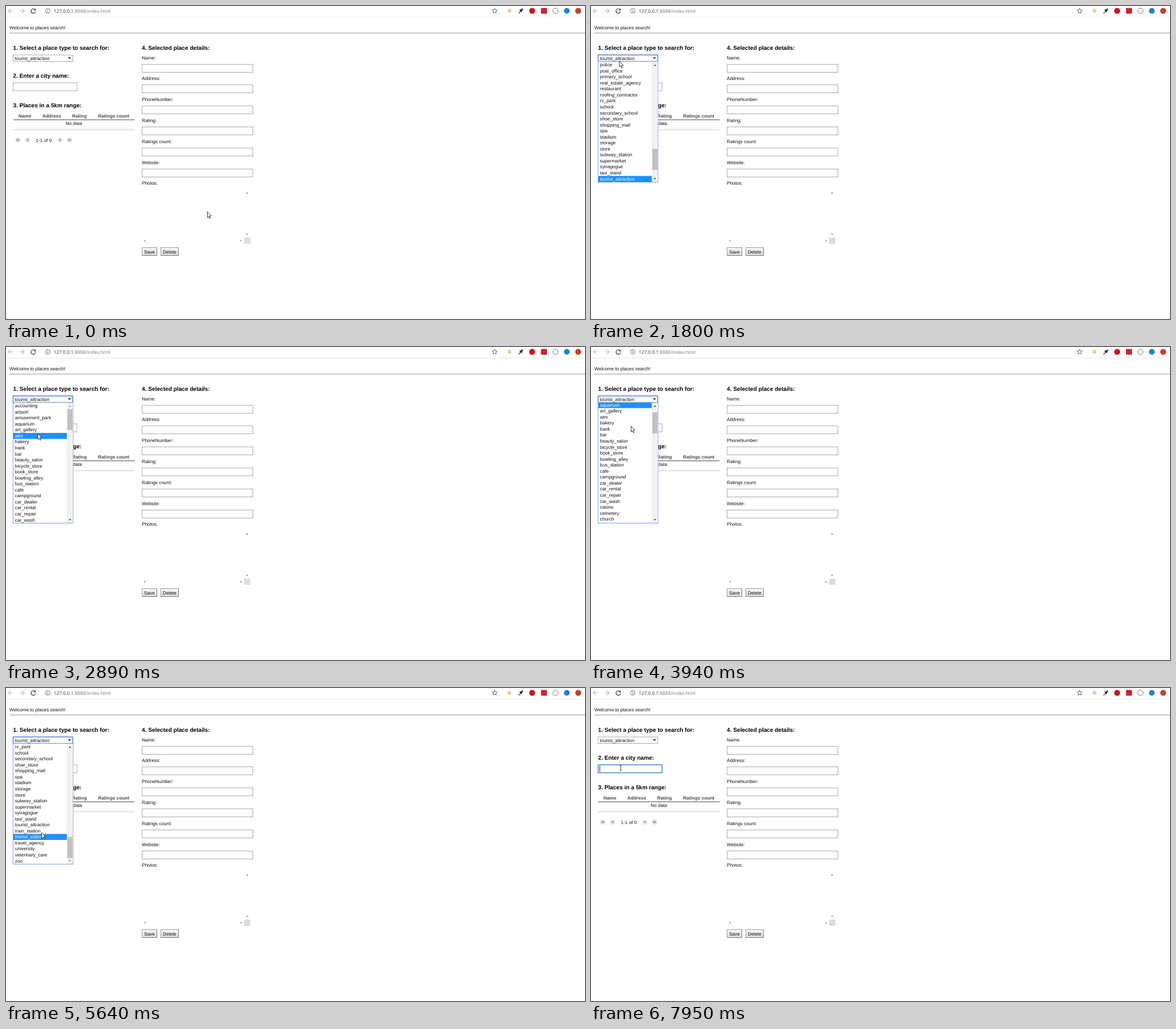
Recreate the animation shown at these times as an HTML page with a canvas. Size 1019 px wide and 550 px high, loop 8 s.

```html
<!DOCTYPE html>
<html lang="en">
<head>
<meta charset="utf-8">
<title>Places search</title>
<style>
html, body { margin: 0; width: 100%; height: 100%; overflow: hidden; background: #fff; }
canvas { display: block; }
</style>
</head>
<body>
<canvas id="stage" width="1019" height="550"></canvas>
<script>
const ctx = document.getElementById('stage').getContext('2d');
const LOOP = 8000, ROW = 10.55, LIST_TOP = 98.2, MAX_SCROLL = 83;
const OPEN = 1390, CLOSE = 6280, FOCUS_INPUT = 6930;
const SANS = '"Liberation Sans", Arial, sans-serif';
const BODY = '8.25px ' + SANS, BOLD = 'bold 8.25px ' + SANS, HEAD = 'bold 10.15px ' + SANS;
const URL_FONT = '8.25px "Open Sans", sans-serif';

const types = `accounting airport amusement_park aquarium art_gallery atm bakery bank bar
beauty_salon bicycle_store book_store bowling_alley bus_station cafe campground car_dealer
car_rental car_repair car_wash casino cemetery church city_hall clothing_store
convenience_store courthouse dentist department_store doctor drugstore electrician
electronics_store embassy establishment finance fire_station florist food funeral_home
furniture_store gas_station general_contractor grocery_or_supermarket gym hair_care
hardware_store health hindu_temple home_goods_store hospital insurance_agency jewelry_store
laundry lawyer library light_rail_station liquor_store local_government_office locksmith
lodging meal_delivery meal_takeaway mosque movie_rental movie_theater moving_company museum
night_club painter park parking pet_store pharmacy physiotherapist place_of_worship plumber
police post_office primary_school real_estate_agency restaurant roofing_contractor rv_park
school secondary_school shoe_store shopping_mall spa stadium storage store subway_station
supermarket synagogue taxi_stand tourist_attraction train_station transit_station
travel_agency university veterinary_care zoo`.split(/\s+/);

// Stepped tracks: [time, ...values], held until the next entry.
const pointer = [
  [0, 354.5, 361.5], [120, 348, 350], [260, 309, 297], [400, 243, 217], [530, 172, 138],
  [670, 115, 84], [810, 78, 62], [940, 58, 76], [1080, 50, 90], [1800, 50, 97],
  [1960, 53.5, 145], [2100, 53.5, 152.5], [2890, 56, 152], [3010, 63, 147], [3300, 67, 143],
  [3440, 70.5, 139], [4230, 68, 150], [4370, 64, 168], [4510, 62, 180.5], [4670, 62, 218],
  [4810, 62, 251], [5240, 62.5, 268], [5380, 62.5, 281], [5640, 62.5, 254],
  [5790, 62.5, 245], [5910, 62.5, 241], [6400, 58, 192], [6660, 52, 140.5]
];
const scrolling = [
  [0, 77], [2100, 66], [2220, 48], [2360, 28.85], [2500, 13], [2640, 3.1], [2770, 0],
  [3940, 3.13], [4090, 25], [4230, 56], [4370, MAX_SCROLL]
];
const hovering = [
  [0, 96], [1960, 81], [2890, 5], [3010, 4], [3440, 3], [4370, 89], [4670, 94],
  [4810, 97], [5240, 99], [5380, 100], [5640, 98], [5790, 97], [5910, 96]
];
const at = (track, t) => track.findLast(key => key[0] <= t).slice(1);

function text(str, x, y, font = BODY, color = '#111') {
  ctx.font = font;
  ctx.fillStyle = color;
  ctx.fillText(str, x, y);
}
function rect(x, y, w, h, color) {
  ctx.fillStyle = color;
  ctx.fillRect(x, y, w, h);
}
function box(x, y, w, h, stroke, fill = '#fff', width = 1) {
  rect(x, y, w, h, fill);
  ctx.strokeStyle = stroke;
  ctx.lineWidth = width;
  ctx.strokeRect(x, y, w, h);
}
function disc(x, y, r, color) {
  ctx.fillStyle = color;
  ctx.beginPath();
  ctx.arc(x, y, r, 0, 7);
  ctx.fill();
}
function path(d, x, y, stroke, width = 1, fill) {
  const shape = new Path2D(d);
  ctx.save();
  ctx.translate(x, y);
  if (fill) { ctx.fillStyle = fill; ctx.fill(shape); }
  if (stroke) { ctx.strokeStyle = stroke; ctx.lineWidth = width; ctx.stroke(shape); }
  ctx.restore();
}
// Triangle pointing right, turned by quarter turns.
function triangle(x, y, turns, color, size = 2.3) {
  ctx.save();
  ctx.translate(x, y);
  ctx.rotate(turns * Math.PI / 2);
  ctx.scale(size, size);
  path('M-.5 -1L.6 0L-.5 1Z', 0, 0, null, 0, color);
  ctx.restore();
}

function drawBrowserBar() {
  path('M4 0H-4M0 -4L-4 0L0 4', 8, 8.5, '#bbb', 1.1);
  path('M-4 0H4M0 -4L4 0L0 4', 28, 8.5, '#bbb', 1.1);
  path('M3.2 -2.2A4 4 0 1 0 4 1', 48, 8.5, '#444', 1.3);
  path('M4.4 -4.4V-.7H.7Z', 48, 8.5, null, 0, '#444');
  path('M4 0A4 4 0 1 1 -4 0A4 4 0 1 1 4 0M0 -.7V2.4M0 -2.4V-1.4', 73.5, 8.5, '#555', .9);
  text('127.0.0.1', 84, 11.5, URL_FONT, '#333');
  const hostWidth = ctx.measureText('127.0.0.1').width;
  text(':8888/index.html', 84 + hostWidth, 11.5, URL_FONT, '#777');
  path('M0 -4.5L1.3 -1.5L4.5 -1.2L2.1 .9L2.8 4L0 2.4L-2.8 4L-2.1 .9L-4.5 -1.2L-1.3 -1.5Z', 860, 8.5, '#555', .9);
  disc(886, 8.5, 3.4, '#e6cfa8');
  path('M-4 4.5L1.5 -1', 906, 8.5, '#777', 1.8);
  path('M-1.5 -2L2 1.5M.5 -.5L3.5 -3.5', 906, 8.5, '#2b3040', 2.6);
  disc(926, 8.5, 5.2, '#c8171d');
  rect(941.5, 3.5, 10.5, 10, '#d0202b');
  path('M4.7 0A4.7 4.7 0 1 1 -4.7 0A4.7 4.7 0 1 1 4.7 0', 967, 8.5, '#777', 1);
  disc(987, 8.5, 5, '#1c7fe0');
  disc(1007, 8.5, 5.2, '#c9402a');
  rect(0, 19, 1019, 1, '#e6e6e6');
}

function drawButton(label, x, w) {
  const shade = ctx.createLinearGradient(0, 425, 0, 439);
  shade.addColorStop(0, '#f8f8f8');
  shade.addColorStop(1, '#d8d8d8');
  box(x + .5, 424.5, w, 14, '#a0a0a0', shade);
  path(`M0 14H${w}V0`, x + .5, 424.5, '#777');
  text(label, x + 4, 435);
}

function drawPage(t) {
  text('Welcome to places search!', 6, 41);
  rect(6, 47, 1013, 1, '#8f9a92');

  text('1. Select a place type to search for:', 12.5, 77, HEAD, '#000');
  const selectFocused = t >= OPEN && t < FOCUS_INPUT;
  const idle = t >= 940 && t < OPEN ? '#777' : '#a9a9a9';
  box(12.5, 86, 105, 11.5, selectFocused ? '#4a78cf' : idle, '#fff', selectFocused ? 1.4 : 1);
  text('tourist_attraction', 15.5, 94.7);
  triangle(111.7, 91.5, 1, '#111', 2.7);

  text('2. Enter a city name:', 12.5, 126, HEAD, '#000');
  const inputFocused = t >= FOCUS_INPUT;
  box(12.5, 135, 112.5, 14, inputFocused ? '#4a84de' : '#a9a9a9', '#fff', inputFocused ? 1.5 : 1);
  if (inputFocused && (t < 7440 || t >= 7950)) rect(15, 137, 1, 10, '#111');

  text('3. Places in a 5km range:', 12.5, 177.5, HEAD, '#000');
  [['Name', 22], ['Address', 64], ['Rating', 116.5], ['Ratings count', 162]]
    .forEach(([label, x]) => text(label, x, 196, BOLD, '#4b4a4a'));
  rect(12.5, 199.3, 214, 1.3, '#6a6c70');
  text('No data', 105, 209);
  rect(12.5, 217, 214, 1, '#ccc');
  [21, 38, 95, 112].forEach(x => disc(x, 235.5, 4.8, '#e6e6e6'));
  rect(18.6, 233.3, 1, 4.4, '#777');
  triangle(21.8, 235.5, 2, '#777');
  triangle(38, 235.5, 2, '#777');
  triangle(95, 235.5, 0, '#777');
  triangle(110.5, 235.5, 0, '#888');
  triangle(113.2, 235.5, 0, '#888');
  text('1-1 of 0', 52.5, 239);

  text('4. Selected place details:', 239, 77, HEAD, '#000');
  ['Name', 'Address', 'PhoneNumber', 'Rating', 'Ratings count', 'Website', 'Photos']
    .forEach((label, i) => {
      const y = 93.5 + i * 36.83;
      text(label + ':', 239, y);
      if (i < 6) box(239.5, Math.round(y + 8) + .5, 195, 14, '#a9a9a9');
    });
  triangle(424.3, 328.5, 3, '#999');
  triangle(424.3, 401.3, 1, '#999');
  triangle(244.3, 412.5, 2, '#999');
  triangle(413.7, 412.5, 0, '#999');
  rect(419, 407, 11, 11, '#dcdcdc');
  drawButton('Save', 239, 26);
  drawButton('Delete', 272, 31);
}

function drawList(t) {
  const [scroll] = at(scrolling, t), [hover] = at(hovering, t);
  box(12.5, 97.5, 105.5, 212, '#7d9fdc');
  ctx.save();
  ctx.beginPath();
  ctx.rect(13, 98, 94, 211);
  ctx.clip();
  for (let i = Math.floor(scroll); i < Math.min(scroll + 20, types.length); i++) {
    const y = LIST_TOP + (i - scroll) * ROW;
    if (i === hover) rect(13, y, 94, ROW, '#1e90ff');
    text(types[i], 15.8, y + 7.9, BODY, i === hover ? '#fff' : '#111');
  }
  ctx.restore();
  rect(107, 98, 10.5, 211, '#f1f1f1');
  rect(108, 109 + scroll / MAX_SCROLL * 153, 9, 37, '#c1c1c1');
  triangle(112.5, 104, 3, scroll > 0 ? '#505050' : '#b0b0b0');
  triangle(112.5, 303.5, 1, scroll < MAX_SCROLL ? '#505050' : '#a3a3a3');
}

function drawPointer(t) {
  const [x, y] = at(pointer, t);
  if (t >= 6660) path('M-1.8 -4.5H-.4L0 -4L.4 -4.5H1.8M0 -4V4M-1.8 4.5H-.4L0 4L.4 4.5H1.8', x + .3, y, '#222', .9);
  else path('M0 0V10.2L2.3 8.1L3.9 11.8L5.4 11.1L3.9 7.5L6.9 7.3Z', x, y, '#222', .9, '#fff');
}

function render(now) {
  const t = now % LOOP;
  ctx.textRendering = 'geometricPrecision';
  rect(0, 0, 1019, 550, '#fff');
  drawBrowserBar();
  drawPage(t);
  if (t >= OPEN && t < CLOSE) drawList(t);
  drawPointer(t);
  requestAnimationFrame(render);
}
const start = performance.now();
requestAnimationFrame(() => render(0));
const frame = window.requestAnimationFrame.bind(window);
window.requestAnimationFrame = draw => frame(() => draw(performance.now() - start));
</script>
</body>
</html>
```
